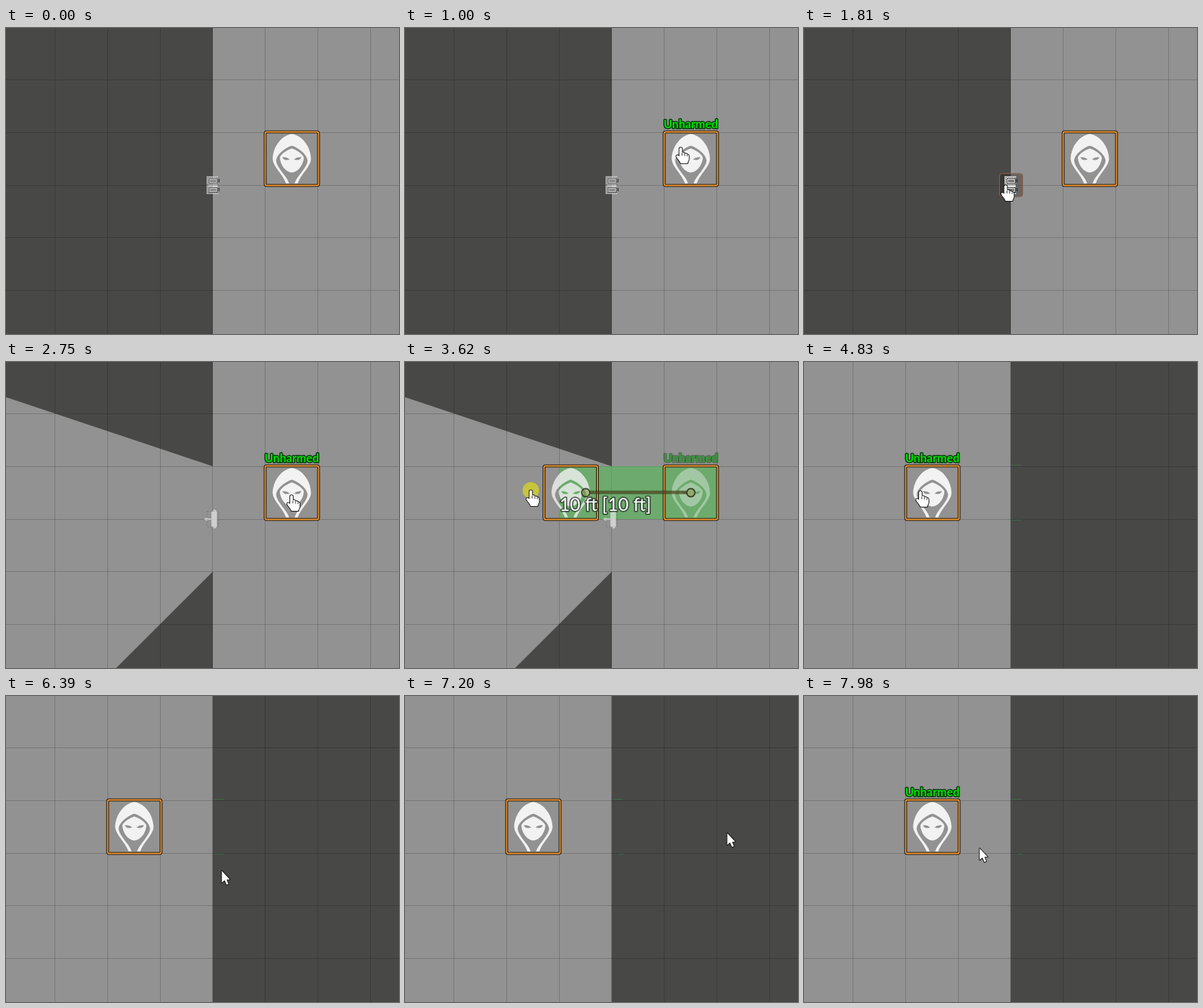
An HTML page with a canvas that plays this animation: 574 by 446 pixels, repeating every 8 s.

```html
<!DOCTYPE html>
<html lang="en">
<head>
<meta charset="utf-8">
<style>
  html, body { margin: 0; width: 100%; height: 100%; overflow: hidden; background: #929292; }
  canvas { display: block; }
</style>
</head>
<body>
<canvas id="stage" width="574" height="446"></canvas>
<script>
const ctx = document.getElementById('stage').getContext('2d');
const W = 574, H = 446, LOOP = 8000;
const CELL = 76.8, WALL = 302, GAP_TOP = 152, GAP_BOTTOM = 305.5;
const START_X = 417.5, END_X = 187.5, ROW_Y = 190.5, DOOR_Y = 229;
const DARK = '#484847', LAG = 80;
const OPEN = 1870, DRAG = 2860, DROP = 4080, GO = 4290, ARRIVE = 4790;

const hood = new Path2D('M0-36C-16-34-28-16-28 1C-27 12-13 23-8.500 36H-4C-8 24-22 14-23 3C-22-8-7-17 0-19' +
  'C7-17 22-8 23 3C22 14 8 24 4 36H8.500C13 23 27 12 28 1C28-16 16-34 0-36Z');
const face = new Path2D('M0-15C-6-13-15-8-17.500-2C-17 10-8 20 0 20C8 20 17 10 17.500-2C15-8 6-13 0-15Z' +
  'M-14-2Q-8-3-3 1Q-11 4-14-2ZM14-2Q8-3 3 1Q11 4 14-2Z');
const hand = new Path2D('M-2 2C-2-.5 2-.5 2 2V7.500C4 7 5.500 7.500 6 9C7.500 8.300 9 9 9.500 10.500C11 10 12 11 12 13' +
  'V17C12 19 10 20 10 23H0C-1 20-4 17-6 14C-7.500 11.500-4.500 10-2 13Z');
const arrow = new Path2D('M0 0V17L4 13.500L7 20L9.500 19L7 12.500H11.700Z');

// Cursor path: time, x, y
const path = [
  [240, 510, 397], [420, 470, 300], [680, 403, 174], [980, 403, 174],
  [1620, 294.5, 229], [1960, 294.5, 229], [2470, 417, 194], [DRAG, 417, 194],
  [3130, 375, 195], [3410, 275, 194], [3540, 242, 194], [3620, 184, 187],
  [3800, 170, 188], [5750, 170, 188], [5960, 310, 300], [6080, 380, 355],
  [6200, 450, 310], [6290, 400, 255], [6390, 316, 255], [6500, 245, 225],
  [6620, 195, 205], [6800, 185, 190], [7000, 320, 190], [7200, 470, 200],
  [7370, 580, 195], [7510, 580, 200], [7620, 470, 205], [7750, 300, 208],
  [7840, 210, 204], [7910, 218, 212], [7980, 256, 222], [8040, 290, 228]
];

function slope(i, k) {
  const a = path[i - 1], b = path[i], c = path[i + 1];
  if (!a || !c || a[k] === b[k] || b[k] === c[k]) return 0;
  return (c[k] - a[k]) / (c[0] - a[0]);
}

function cursorAt(t) {
  if (t < path[0][0]) return { x: 700, y: 500 };
  const i = path.findIndex(p => p[0] > t) - 1, a = path[i], b = path[i + 1];
  const d = b[0] - a[0], u = (t - a[0]) / d;
  const hermite = k => a[k] * (1 + 2 * u) * (1 - u) ** 2 + b[k] * u * u * (3 - 2 * u)
    + d * (slope(i, k) * u * (1 - u) ** 2 - slope(i + 1, k) * u * u * (1 - u));
  return { x: hermite(1), y: hermite(2) };
}

const between = (t, a, b) => t >= a && t < b;
const near = (p, x, y, r) => Math.abs(p.x - x) < r && Math.abs(p.y - y) < r;

function tokenX(t) {
  const u = Math.min(1, Math.max(0, (t - GO) / (ARRIVE - GO)));
  return START_X + (END_X - START_X) * u;
}

function rect(color, x, y, w, h) {
  ctx.fillStyle = color;
  ctx.fillRect(x, y, w, h);
}

function polygon(color, ...points) {
  ctx.fillStyle = color;
  ctx.beginPath();
  points.forEach(p => ctx.lineTo(...p));
  ctx.fill();
}

function stroke(color, width, shape) {
  ctx.strokeStyle = color;
  ctx.lineWidth = width;
  ctx.stroke(shape);
}

function rounded(x, y, w, h, r) {
  const p = new Path2D();
  p.roundRect(x, y, w, h, r);
  return p;
}

function disc(x, y, r) {
  const p = new Path2D();
  p.arc(x, y, r, 0, 7);
  return p;
}

function text(str, x, y, font, fill, outline, width) {
  ctx.font = font;
  ctx.lineJoin = 'round';
  ctx.strokeStyle = outline;
  ctx.lineWidth = width;
  ctx.strokeText(str, x, y);
  ctx.fillStyle = fill;
  ctx.fillText(str, x, y);
}

function drawShadows(t, x) {
  if (t < OPEN) return rect(DARK, 0, 0, WALL, H);
  if (x <= WALL) return rect(DARK, WALL, 0, W - WALL, H);
  // Each side of the doorway casts a shadow away from the token
  for (const [y, edge] of [[GAP_TOP, 0], [GAP_BOTTOM, H]]) {
    const reach = 2000, dx = WALL - x, dy = y - ROW_Y;
    polygon(DARK, [WALL, y], [WALL + dx * reach, y + dy * reach], [WALL, edge + dy * reach]);
  }
}

function drawGrid() {
  for (let i = 0; i < 7; i++) {
    rect('rgba(0,0,0,.19)', Math.round(71 + i * CELL), 0, 1, H);
    if (i < 5) rect('rgba(0,0,0,.19)', 0, Math.round(75 + i * CELL), W, 1);
  }
}

function drawDoor(t, hover) {
  if (t >= DROP) return;
  ctx.save();
  ctx.translate(WALL, DOOR_Y);
  if (hover) {
    const box = rounded(-16.5, -17, 34, 34, 4);
    ctx.fillStyle = 'rgba(40,32,30,.4)';
    ctx.fill(box);
    stroke('#94604c', 1, box);
  }
  ctx.globalAlpha = hover ? 1 : .72;
  if (t < OPEN) {
    rect('#e8e8e8', -9, -13, 17, 26);
    rect('#555', -9, -1, 17, 1);
    for (const y of [-10, 3]) {
      rect('#333', -6, y, 13, 8);
      rect('#eee', -5, y + 1, 11, 6);
      rect('#777', -4, y + 2, 9, 4);
      rect('#333', 8, y + 1, 2, 5);
    }
    ctx.setLineDash([2, 1]);
    stroke('#444', 1, rounded(-7.5, -11.5, 15, 23, 0));
  } else {
    polygon('#e6e6e6', [-2, -10], [2, -14], [6, -12], [6, 12], [2, 14], [-2, 10]);
    rect('#ddd', -9, -1, 7, 2);
    polygon('#ddd', [-13, 0], [-8, -3], [-8, 3]);
    ctx.setLineDash([2, 2]);
    stroke('rgba(70,70,70,.5)', 1, rounded(-8.500, -11.5, 17, 23, 1));
  }
  ctx.restore();
}

function drawToken(x, y, alpha, labelled) {
  ctx.save();
  ctx.translate(x, y);
  const frame = rounded(-39, -39, 78, 78, 2);
  stroke('#1c1408', 4, frame);
  stroke('#f59a33', 1.8, frame);
  ctx.globalAlpha = alpha;
  ctx.fillStyle = '#f2f2f2';
  ctx.fill(hood);
  ctx.fill(face, 'evenodd');
  if (labelled) {
    ctx.textAlign = 'center';
    text('Unharmed', 0, -45, '700 17px Lato, sans-serif', '#00e000', '#04380a', 3);
  }
  ctx.restore();
}

function drawRuler(steps) {
  const x = START_X - steps * CELL;
  if (steps) {
    rect('rgba(40,30,10,.55)', x + 6, ROW_Y - 3, START_X - x - 12, 5);
    rect('rgba(110,100,40,.4)', x + 6, ROW_Y - 2, START_X - x - 12, 3);
  }
  for (const end of [START_X, x]) {
    const knob = disc(end, ROW_Y, 6);
    ctx.fillStyle = 'rgba(130,140,60,.5)';
    ctx.fill(knob);
    stroke('rgba(35,45,25,.85)', 1.8, knob);
  }
  if (steps) {
    const feet = steps * 5 + ' ft';
    text(`${feet} [${feet}]`, x - 38.5, 216.5, '400 26.5px Lato, sans-serif', '#fafafa', 'rgba(40,45,40,.75)', 3.5);
  }
}

function drawCursor(t, p, pointing) {
  if (between(t, 860, 990) || between(t, 1670, 1800) || between(t, 2790, DROP)) {
    ctx.fillStyle = 'rgba(208,204,48,.85)';
    ctx.fill(disc(p.x, p.y, 12));
  }
  ctx.save();
  ctx.translate(p.x, p.y);
  const shape = pointing ? hand : arrow;
  stroke('#111', 2, shape);
  ctx.fillStyle = '#fff';
  ctx.fill(shape);
  if (pointing) stroke('#333', 1, new Path2D('M2 8V12M6 9V12.500M9.500 10.500V13'));
  ctx.restore();
}

function draw(t) {
  const cursor = cursorAt(t), late = cursorAt(t - LAG);
  const x = tokenX(t), dragging = between(t, DRAG + LAG, DROP);
  const ghost = { x: late.x + .5, y: late.y - 3.5 };
  const hover = dragging || near(late, tokenX(t - LAG), ROW_Y, 39);
  const doorHover = t < DRAG && near(cursor, WALL, DOOR_Y, 18);
  const measuring = between(t, DRAG + LAG, ARRIVE + 20);
  const steps = dragging ? Math.round((START_X - ghost.x) / CELL) : 3;

  rect('#929292', 0, 0, W, H);
  drawShadows(t, x);
  drawGrid();
  if (measuring) {
    const left = START_X - 39 - steps * CELL;
    rect('rgba(72,198,74,.5)', left, GAP_TOP, START_X + 38.5 - left, 77);
  }
  drawDoor(t, doorHover);
  drawToken(x, ROW_Y, dragging ? .4 : 1, hover);
  if (dragging) drawToken(ghost.x, ghost.y, .8, false);
  if (measuring) drawRuler(steps);
  if (t >= ARRIVE + 20) {
    rect('#3f6a45', 303, 150, 15, 1);
    if (t < 7000) rect('#3f6a45', 303, 230, 15, 1);
    else rect('#3f6a45', 313, 230, 6, 1);
  }
  drawCursor(t, cursor, dragging || doorHover || near(cursor, x, ROW_Y, 39));
}

function tick() {
  draw(performance.now() % LOOP);
  requestAnimationFrame(tick);
}
tick();
</script>
</body>
</html>
```
